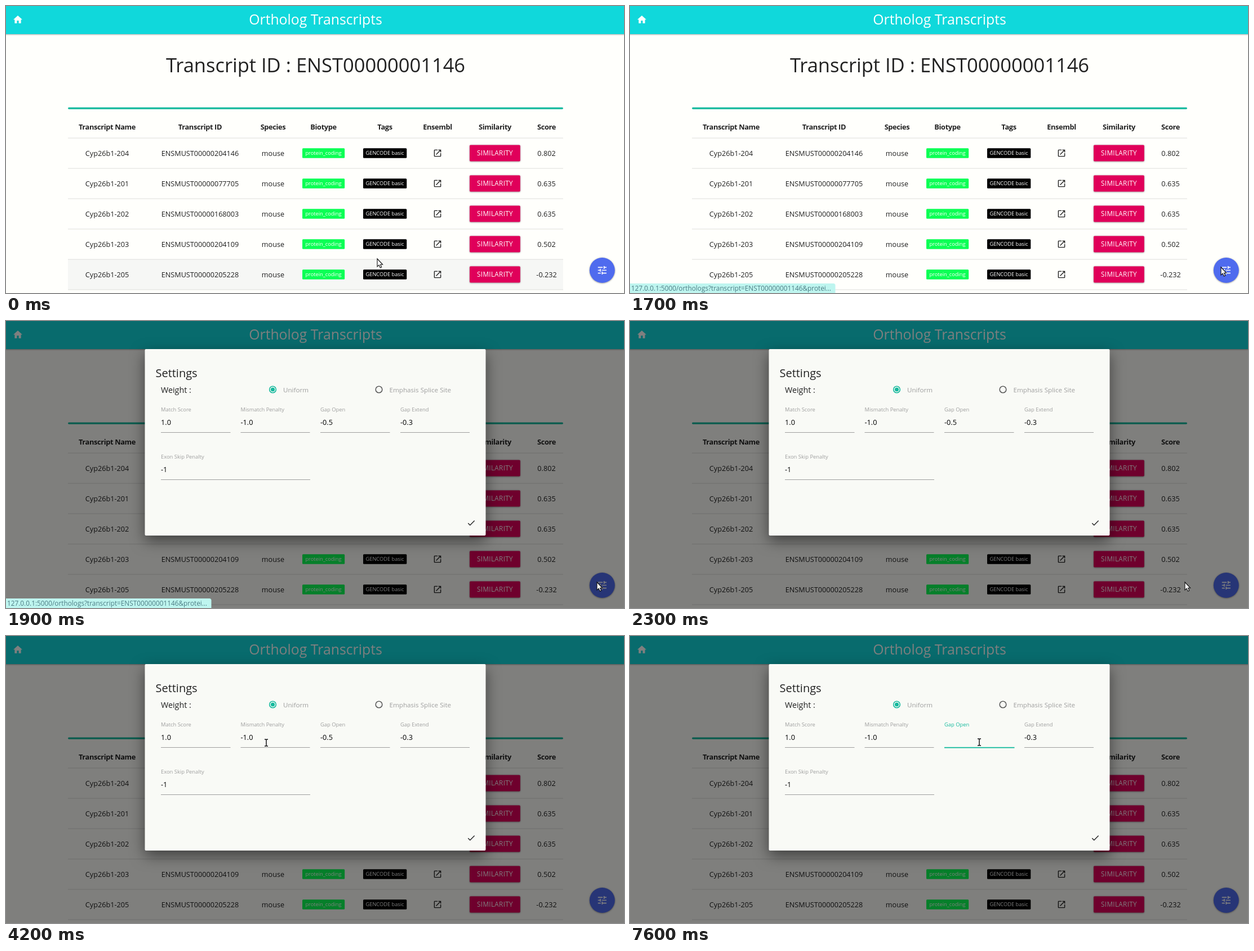
An HTML page for the animation above (8000 ms loop, 1097x511 px).

```html
<!DOCTYPE html>
<html lang="en">
<head>
<meta charset="utf-8">
<title>Ortholog Transcripts</title>
<style>
  html, body { margin: 0; width: 100%; height: 100%; overflow: hidden; background: #fffffc; }
  svg { display: block; width: 1097px; height: 511px; font-family: "Open Sans", "Noto Sans", sans-serif; fill: #212121; }
  .mid { text-anchor: middle; }
  .head { font-weight: 700; font-size: 12.8px; letter-spacing: -.35px; }
  .cell { font-size: 12.65px; }
  .badge { font-size: 9.25px; fill: #fff; }
  .button { font-size: 11.7px; letter-spacing: .35px; fill: #fff; }
  .label { font-size: 9.4px; fill: #9e9e9e; }
  .option { font-size: 11.65px; fill: #9e9e9e; }
  .raised { filter: drop-shadow(0 1.2px .9px rgba(0, 0, 0, .24)) drop-shadow(0 .8px 1.8px rgba(0, 0, 0, .2)); }
  #panel { filter: drop-shadow(0 9px 13px rgba(0, 0, 0, .5)); }
</style>
</head>
<body>
<svg id="stage" viewBox="0 0 1097 511"></svg>
<script>
const TEAL = '#14b99d';
const ICONS = {
  home: 'M10 20v-6h4v6h5v-8h3L12 3 2 12h3v8z',
  tune: 'M3 17v2h6v-2H3zM3 5v2h10V5H3zm10 16v-2h8v-2h-8v-2h-2v6h2zM7 9v2H3v2h4v2h2V9H7zm14 4v-2H11v2h10zm-6-4h2V7h4V5h-4V3h-2v6z',
  open: 'M19 19H5V5h7V3H5c-1.1 0-2 .9-2 2v14c0 1.1.9 2 2 2h14c1.1 0 2-.9 2-2v-7h-2v7zM14 3v2h3.6l-9.8 9.8 1.4 1.4L19 6.4V10h2V3h-7z',
  check: 'M9 16.2L4.8 12l-1.4 1.4L9 19 21 7l-1.4-1.4z'
};

const text = (x, y, str, attrs = '') => `<text x="${x}" y="${y}" ${attrs}>${str}</text>`;
const mid = (x, y, str, cls, attrs = '') => text(x, y, str, `class="mid ${cls}" ${attrs}`);
const rect = (x, y, w, h, fill, attrs = '') =>
  `<rect x="${x}" y="${y}" width="${w}" height="${h}" fill="${fill}" ${attrs}/>`;
const icon = (name, cx, cy, scale, fill = '#212121') =>
  `<path d="${ICONS[name]}" fill="${fill}" transform="translate(${cx} ${cy}) scale(${scale}) translate(-12 -12)"/>`;
const separator = y => rect(110, y - .4, 879, 1, '#dededb');

const columns = [
  [179.5, 'Transcript Name'], [344.5, 'Transcript ID'], [474, 'Species'], [563.5, 'Biotype'],
  [672.5, 'Tags'], [766, 'Ensembl'], [868, 'Similarity'], [959.5, 'Score']
];
const rows = [
  ['204', '204146', '0.802'], ['201', '077705', '0.635'], ['202', '168003', '0.635'],
  ['203', '204109', '0.502'], ['205', '205228', '-0.232']
];

function tableRow([name, id, score], i) {
  const y = 262 + 54 * i;
  return mid(179.5, y + 4.5, 'Cyp26b1-' + name, 'cell')
    + mid(344.5, y + 4.5, 'ENSMUST00000' + id, 'cell')
    + mid(474, y + 4.5, 'mouse', 'cell')
    + rect(526, y - 8.8, 75.2, 17.6, '#0cff55', 'rx="1.6"') + mid(563.5, y + 3, 'protein_coding', 'badge')
    + rect(634, y - 8.8, 77.3, 17.6, '#000', 'rx="1.6"') + mid(672.5, y + 3, 'GENCODE basic', 'badge')
    + icon('open', 766, y, .7)
    + rect(823, y - 14.6, 89.8, 29, '#e0005a', 'rx="1.6" class="raised"') + mid(868, y + 4, 'SIMILARITY', 'button')
    + mid(959.5, y + 4.5, score, 'cell')
    + separator(y + 27);
}

const field = (x, y, width, label, value, id = '') =>
  text(x, y, label, `class="label" id="${id}Label"`)
  + text(x, y + 24, value, `font-size="12.7" fill="#000" id="${id}Value"`)
  + rect(x, y + 37, width, 1, '#9e9e9e');

const radio = (x, label, labelX, color) =>
  `<circle cx="${x}" cy="122" r="5.8" fill="none" stroke="${color}" stroke-width="1.6"/>`
  + text(labelX, 126.5, label, 'class="option"');

document.getElementById('stage').innerHTML =
  rect(0, 0, 1097, 511, '#fffffc')
  + rect(110, 451, 879, 54, '#f6f7f5', 'id="hover"')
  + mid(549.5, 118, 'Transcript ID : ENST00000001146', '', 'font-size="34.5"')
  + rect(110, 180.5, 879, 3.2, TEAL, 'rx="1.6"')
  + columns.map(([x, name]) => mid(x, 220, name, 'head')).join('')
  + separator(235)
  + rows.map(tableRow).join('')
  + rect(-5, -5, 1107, 55, '#10d8db', 'class="raised"')
  + icon('home', 21, 24.3, .8, '#fff')
  + mid(549.5, 33, 'Ortholog Transcripts', '', 'font-size="24.8" fill="#fff"')
  + '<circle cx="1058.3" cy="470.5" r="22.5" fill="#4f6bee" class="raised"/>'
  + icon('tune', 1058.3, 470.5, .84, '#fff')
  + rect(0, 0, 1097, 511, '#000', 'id="shade"')
  + '<g id="dialog">'
  + rect(246.5, 50, 605, 332, '#f9faf6', 'rx="2" id="panel"')
  + text(265.5, 100, 'Settings', 'font-size="20"')
  + text(275, 128, 'Weight :', 'font-size="14.3"')
  + radio(473.5, 'Uniform', 492, TEAL) + `<circle cx="473.5" cy="122" r="3.6" fill="${TEAL}"/>`
  + radio(662, 'Emphasis Splice Site', 680.5, '#5a5a5a')
  + field(275, 161, 123.5, 'Match Score', '1.0')
  + field(416.5, 161, 123, 'Mismatch Penalty', '-1.0')
  + field(558, 161, 123.5, 'Gap Open', '-0.5', 'gap')
  + field(700, 161, 123, 'Gap Extend', '-0.3')
  + field(275, 245, 265, 'Exon Skip Penalty', '-1')
  + rect(558, 197.8, 124.5, 1.8, TEAL, 'id="focus"')
  + rect(580, 173, 1, 14, '#000', 'id="caret"')
  + icon('check', 825.8, 359.6, .7)
  + '</g>'
  + '<g id="tip"><path d="M0 494H361q3.5 0 3.5 3.5V511H0z" fill="#bef5ef"/>'
  + text(2, 507, '127.0.0.1:5000/orthologs?transcript=ENST00000001146&amp;protei…', 'font-size="11.8" fill="#4c7c84"')
  + '</g>'
  + '<path id="arrow" d="M0 0V14L3.1 11.2 5.3 16 7.7 15 5.6 10.3H9.6z" fill="#fff" stroke="#111" stroke-width="1.1"/>'
  + '<g id="beam" fill="none"><path d="M-3-6H3M0-6V6M-3 6H3" stroke="#fff" stroke-width="3.4"/>'
  + '<path d="M-3-6H-1L0-5 1-6H3M0-5V5M-3 6H-1L0 5 1 6H3" stroke="#111" stroke-width="1.5"/></g>';

// Pointer path: time, x, y
const path = [
  [0, 659, 450], [300, 659, 450], [800, 850, 456], [1200, 1049, 461], [1300, 1049, 465],
  [2000, 1049, 465], [2300, 985, 465], [2500, 789, 417], [2600, 789, 417], [3000, 610, 275],
  [3400, 485, 189], [4100, 485, 189], [4200, 462, 190], [4600, 337, 187], [4700, 337, 187],
  [4800, 318, 190], [5000, 490, 204], [5100, 577, 200], [5200, 577, 200], [5400, 620, 189], [8000, 620, 189]
];
const clamp = v => Math.min(1, Math.max(0, v));
const $ = id => document.getElementById(id);
const show = (id, amount) => $(id).setAttribute('opacity', Number(amount));

function pointerAt(t) {
  const i = path.findIndex(p => p[0] > t);
  const [a, b] = [path[i - 1], path[i]];
  const k = (t - a[0]) / (b[0] - a[0]);
  return [a[1] + (b[1] - a[1]) * k, a[2] + (b[2] - a[2]) * k];
}

function draw(t) {
  const [x, y] = pointerAt(t);
  const beam = t >= 3300 && y <= 200;
  for (const id of ['arrow', 'beam']) {
    $(id).setAttribute('transform', `translate(${x} ${y})`);
    show(id, beam === (id === 'beam'));
  }
  show('hover', t < 1300 && x < 989);
  show('tip', t < 2000 ? clamp((t - 1200) / 300) : 0);

  const p = 1 - (1 - clamp((t - 1700) / 190)) ** 3;
  show('shade', p < 1 ? .43 * p : .5);
  show('dialog', p);
  $('dialog').setAttribute('transform',
    `translate(549 ${216 - 30.6 * (1 - p)}) scale(${.8 + .2 * p}) translate(-549 -216)`);

  const focus = clamp((t - 5800) / 300);
  show('focus', focus);
  $('gapLabel').style.fill = `color-mix(in srgb, ${TEAL} ${focus * 100}%, #9e9e9e)`;
  const deleted = [6900, 7100, 7300, 7600].filter(at => t >= at).length;
  const value = $('gapValue');
  value.textContent = '-0.5'.slice(0, 4 - deleted);
  $('caret').setAttribute('x', 558 + Math.round(value.getComputedTextLength()));
  show('caret', (t >= 5800 && t < 6400) || (t >= 6900 && t < 7600));
}

// The screen refreshes ten times a second
const start = performance.now();
function tick() {
  const t = (performance.now() - start) % 8000;
  draw(Math.floor(t / 100) * 100);
  requestAnimationFrame(tick);
}
tick();
</script>
</body>
</html>
```
